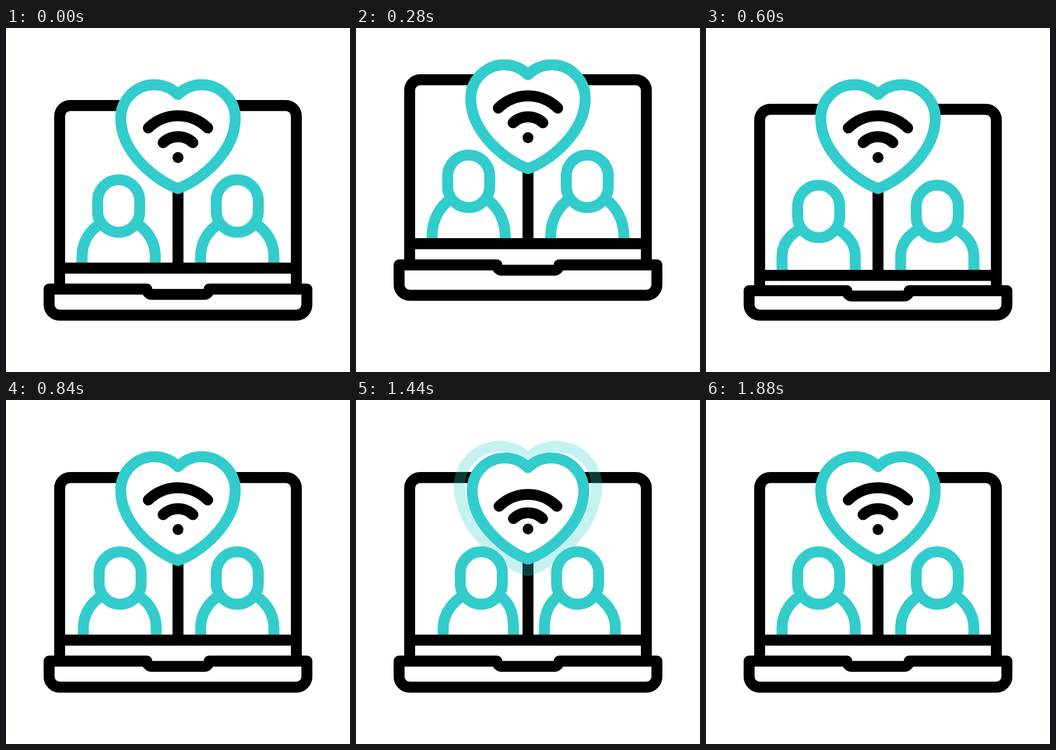
These frames come from a looping animation (640x640 px, 2 s). An HTML page:

```html
<!DOCTYPE html>
<html lang="en">
<head>
<meta charset="utf-8">
<title>Video call</title>
<style>
  html, body { margin: 0; width: 100%; height: 100%; overflow: hidden; background: #fff; }
  svg { display: block; width: 100%; height: 100%; }
  .line { fill: none; stroke: #000; stroke-width: 20.4; stroke-linecap: round; stroke-linejoin: round; }
  .teal { stroke: #3cc; }
  .butt { stroke-linecap: butt; }
</style>
</head>
<body>
<svg viewBox="0 0 640 640">
  <g class="line">
    <g class="teal">
      <path id="bodyL"/><rect id="headL" width="78.2" height="97.6" rx="39.1"/>
      <path id="bodyR"/><rect id="headR" width="78.2" height="97.6" rx="39.1"/>
    </g>
    <path id="screen" class="butt"/>
    <path id="divider" class="butt"/>
    <path id="bar" class="butt"/>
    <path id="base" fill="#fff"/>
    <path id="halo" class="teal"/>
    <g id="heart">
      <path id="heartShape" class="teal" fill="#fff"/>
      <path id="arcOuter" d="M264.8 186A78.5 78.5 0 0 1 375.2 186"/>
      <path id="arcInner" d="M292.3 213.3A40.4 40.4 0 0 1 347.7 213.3"/>
      <circle cx="320" cy="241" r="10.2" fill="#000" stroke="none"/>
    </g>
  </g>
</svg>
<script>
const LOOP = 2000, STEP = 40, WIDTH = 20.4;
const $ = id => document.getElementById(id);
const set = (id, attrs) => {
  for (const k in attrs) $(id).setAttribute(k, attrs[k]);
};

// Each track lists [time, value] pairs.
const tracks = {
  jump:    [[80, 0], [160, -10], [280, -37], [330, -40], [440, -24], [520, -5], [560, 0]],
  top:     [[80, 0], [160, -14], [280, -48], [330, -50], [440, -29], [520, -7], [600, 7], [760, 0]],
  bar:     [[80, 0], [160, -13], [280, -45.5], [330, -47], [440, -24], [520, 0], [600, 13.5], [760, 0]],
  deck:    [[80, 0], [160, -13], [280, -45], [330, -47], [440, -28], [520, -8], [600, 3], [760, 0]],
  head:    [[80, 0], [160, -13], [280, -46], [330, -48], [440, -28], [520, -5], [600, 10], [760, 0]],
  left:    [[760, 0], [920, 7.5], [1080, 16.5], [1240, 22], [1440, 23.5], [1600, 15], [1760, 4.5], [1880, 0]],
  right:   [[1000, 0], [1080, -3], [1240, -11.5], [1440, -18], [1600, -13], [1760, -4.5], [1880, 0]],
  outer:   [[920, 0], [1080, -6.2], [1140, -7], [1280, 2], [1440, 11.6], [1600, 6], [1760, 0]],
  inner:   [[920, 0], [1080, -3.4], [1140, -4], [1280, 1], [1440, 7.8], [1640, 4], [1840, 0]],
  pulse:   [[920, 1], [1080, 1.01], [1140, 1.012], [1440, 0.975], [1760, 1]],
  spread:  [[960, 1], [1080, 1.05], [1200, 1.09], [1440, 1.2], [1680, 1.29]],
  glow:    [[960, 0], [1040, 0.22], [1080, 0.24], [1200, 0.284], [1440, 0.284], [1720, 0]]
};

// Smooth interpolation that never overshoots its keys.
function at(keys, t) {
  const last = keys.length - 1;
  if (t <= keys[0][0]) return keys[0][1];
  if (t >= keys[last][0]) return keys[last][1];
  const i = keys.findIndex(k => k[0] > t) - 1;
  const rise = j => (keys[j + 1][1] - keys[j][1]) / (keys[j + 1][0] - keys[j][0]);
  const slope = j => {
    if (j === 0 || j === last) return 0;
    const a = rise(j - 1), b = rise(j);
    return a * b > 0 ? 2 * a * b / (a + b) : 0;
  };
  const [t0, a] = keys[i], [t1, b] = keys[i + 1];
  const h = t1 - t0, u = (t - t0) / h, v = 1 - u;
  return a * (1 + 2 * u) * v * v + slope(i) * h * u * v * v
       + b * u * u * (3 - 2 * u) - slope(i + 1) * h * u * u * v;
}

function person(side, cx, shift, dir, p) {
  const x = cx + shift, top = 363 + p.head, knee = 424 + p.jump, h = knee - top;
  const end = 446.7 + p.bar;
  const foot = s => cx + s * 68.1 + shift * (s === dir ? 0.88 : 0.65);
  const arm = s => {
    const f = foot(s);
    return `M${f} ${end}V${knee}C${f} ${knee - 0.43 * h} ${x - s * -53.5} ${top + 0.21 * h} ${x + s * 32.3} ${top}`;
  };
  set('head' + side, { x: x - 39.1, y: 282.4 + p.head });
  set('body' + side, { d: arm(-1) + arm(1) });
}

const scaled = (s, dy) => `translate(320 ${201.5 + dy}) scale(${s}) translate(-320 -201.5)`;

function draw(t) {
  const p = {};
  for (const k in tracks) p[k] = at(tracks[k], t);

  const top = 144.3 + p.top, bar = 446.7 + p.bar, deck = 485.8 + p.deck, floor = 534.3 + p.jump;
  set('screen', { d: `M99.8 ${deck}V${top + 19.6}A19.6 19.6 0 0 1 119.4 ${top}H520.6A19.6 19.6 0 0 1 540.2 ${top + 19.6}V${deck}` });
  set('divider', { d: `M320 ${280 + p.jump}V${bar}` });
  set('bar', { d: `M99.8 ${bar}H540.2` });
  set('base', {
    d: `M80.2 ${deck}H262a9.8 9.8 0 0 0 9.8 9.8h96.4a9.8 9.8 0 0 0 9.8 -9.8H559.8` +
       `V${floor - 19.6}A19.6 19.6 0 0 1 540.2 ${floor}H99.8A19.6 19.6 0 0 1 80.2 ${floor - 19.6}Z`
  });

  person('L', 209.6, p.left, -1, p);
  person('R', 430.3, p.right, 1, p);

  set('halo', { transform: scaled(p.spread, p.jump), 'stroke-opacity': p.glow });
  $('halo').style.strokeWidth = WIDTH / p.spread;
  set('heart', { transform: scaled(p.pulse, p.jump) });
  for (const id of ['heartShape', 'arcOuter', 'arcInner']) $(id).style.strokeWidth = WIDTH / p.pulse;
  set('arcOuter', { transform: `translate(0 ${p.outer})` });
  set('arcInner', { transform: `translate(0 ${p.inner})` });
}

const heart = 'M320 124C308.5 112.5 293 105.5 275.8 105.5C241.4 105.5 213.5 133.6 213.5 168C213.5 232 281 286 320 298.5' +
              'C359 286 426.5 232 426.5 168C426.5 133.6 398.6 105.5 364.2 105.5C347 105.5 331.5 112.5 320 124Z';
set('halo', { d: heart });
set('heartShape', { d: heart });
$('base').style.fill = $('heartShape').style.fill = '#fff';

const start = performance.now();
function tick() {
  const t = (performance.now() - start) % LOOP;
  draw(t < 120 ? 0 : Math.min(1880, Math.floor(t / STEP) * STEP));
  requestAnimationFrame(tick);
}
tick();
</script>
</body>
</html>
```
